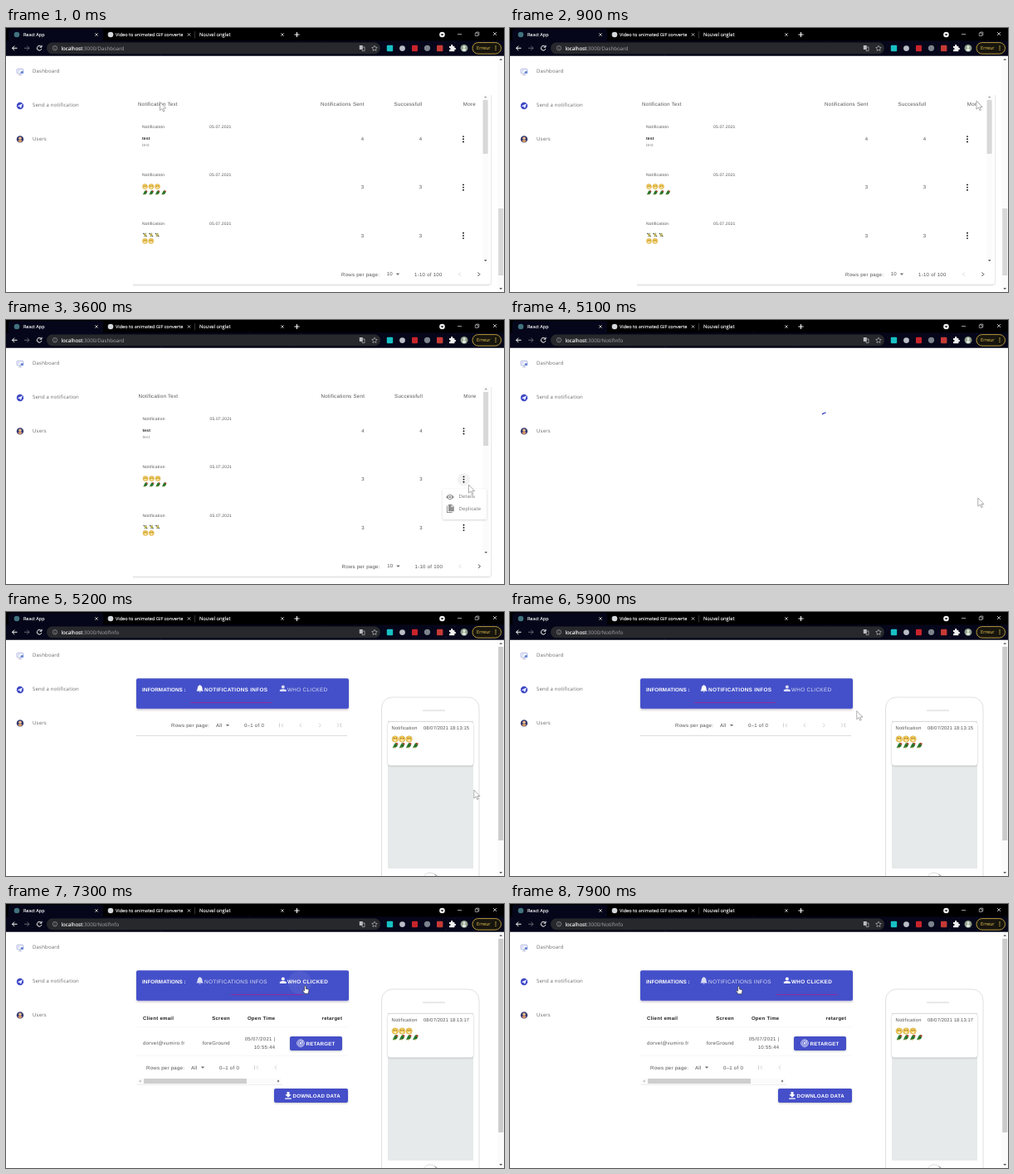
Write an HTML page that moves like this. It is 600 px wide and 319 px high and loops after 8 s.

```html
<!DOCTYPE html>
<html lang="en">
<head>
<meta charset="utf-8">
<title>Dashboard</title>
<style>
html, body { margin: 0; width: 100%; height: 100%; overflow: hidden; background: #fff; }
svg { display: block; width: 100vw; height: 100vh; }
text { font-family: "Liberation Sans", Arial, sans-serif; font-size: 6px; fill: #555; text-rendering: geometricPrecision; white-space: pre; }
.ui, .nav { font-family: "Open Sans", "Noto Sans", sans-serif; }
.ui { fill: #fff; font-size: 5.55px; stroke: #fff; stroke-width: .12px; }
.nav { fill: #666; letter-spacing: .2px; }
.head { font-size: 6.2px; letter-spacing: .25px; }
.small { font-size: 5px; letter-spacing: .2px; }
.date { font-size: 5px; letter-spacing: .15px; }
.page { font-size: 6.1px; letter-spacing: .25px; }
.cell { letter-spacing: .3px; }
.phone { font-size: 5.8px; letter-spacing: .2px; }
.clock { font-size: 5.8px; letter-spacing: .1px; }
.item { letter-spacing: .2px; }
.tab { font-size: 6.4px; letter-spacing: .3px; fill: #fff; }
.btn { font-size: 6.2px; letter-spacing: .18px; fill: #fff; font-weight: 700; }
.bold { font-weight: 700; fill: #222; }
.end { text-anchor: end; }
</style>
</head>
<body>
<svg id="stage" viewBox="0 0 600 319" preserveAspectRatio="none"></svg>
<script>
const BLUE = '#4450c9';
const stage = document.getElementById('stage');

const text = (cls, x, y, s, more = '') => `<text class="${cls}" x="${x}" y="${y}" ${more}>${s}</text>`;
const rect = (x, y, w, h, fill, r = 0, more = '') =>
  `<rect x="${x}" y="${y}" width="${w}" height="${h}" rx="${r}" fill="${fill}" ${more}/>`;
const dot = (x, y, r, fill, more = '') => `<circle cx="${x}" cy="${y}" r="${r}" fill="${fill}" ${more}/>`;
const line = (d, color, w = 1) =>
  `<path d="${d}" fill="none" stroke="${color}" stroke-width="${w}" stroke-linejoin="round"/>`;
const fill = (d, color) => `<path d="${d}" fill="${color}"/>`;
const use = (id, x, y, k = 1) => `<use href="#${id}" transform="translate(${x} ${y}) scale(${k})"/>`;
const group = (id, body, more = '') => `<g id="${id}" ${more}>${body}</g>`;
const repeat = (n, fn) => Array.from({ length: n }, (_, i) => fn(i)).join('');
const cross = (x, y, r, c) => line(`M${x - r} ${y - r}l${2 * r} ${2 * r}m0 ${-2 * r}l${-2 * r} ${2 * r}`, c, .8);
const chevron = (x, y, dir, c) => line(`M${x - dir} ${y - 2.2}l${2.2 * dir} 2.2l${-2.2 * dir} 2.2`, c, .9);
const drop = (x, y) => fill(`M${x - 2.2} ${y - 1}h4.4l-2.2 2.2z`, '#666');
const more = (x, y) => repeat(3, i => dot(x, y + (i - 1) * 3.2, .95, '#111'));

const defs = `<defs>
<filter id="soft" x="-20%" y="-20%" width="140%" height="140%"><feDropShadow dx="0" dy=".8" stdDeviation="1" flood-opacity=".25"/></filter>
<clipPath id="below"><rect x="153" y="81" width="442" height="238"/></clipPath>
<g id="face">${dot(0, 0, 3.1, '#f2cb5a', 'stroke="#c79a3c" stroke-width=".4"')}
${dot(-1.1, -.7, .5, '#6b4a1e')}${dot(1.1, -.7, .5, '#6b4a1e')}${fill('M-1.5 .8h3q-.3 1.4-1.5 1.4t-1.5-1.4z', '#fff3d2')}</g>
<g id="parrot">${fill('M-2.8 2.6Q-1.8.4-1-1.4Q0-3.2 1.7-2.6Q3-1.8 2.2.2Q.8 2.4-1 2z', '#2f7d32')}
${fill('M.8-2.8q2.1-.4 2.1 1.6l-1.5.5z', '#c8402f')}${fill('M-.8 1Q0-.8 1.4-.5Q.8 1.3-.8 1z', '#155c24')}${dot(-.4, 2.2, .6, '#d8a03c')}</g>
<g id="bird">${fill('M-2.9-2.5L-.4-1.3L1-2.8L1.3 0L2.7 2.3L.2 1.6L-1.5 2.8L-.9.4z', '#83935a')}
${dot(.2, 0, 1.1, '#e0c443')}${dot(-1.8, -1.6, .7, '#444b55')}${dot(1.5, 1.6, .7, '#444b55')}</g>
</defs>`;

function stars() {
  let seed = 7;
  const rnd = () => (seed = seed * 16807 % 2147483647) / 2147483647;
  return repeat(90, () => dot((rnd() * 600).toFixed(1), (14 + rnd() * 19).toFixed(1), .45, '#6674c0',
    `opacity="${(.1 + rnd() * .4).toFixed(2)}"`));
}

function chrome() {
  const puzzle = fill('M534 22h2q-.4-2 1.2-2t1.2 2h2v2q1.8-.3 1.8 1.1t-1.8 1.1v2h-6.4v-2q1.6 0 1.6-1.2t-1.6-1.1z', '#f1f1f1');
  return rect(0, 0, 600, 33.5, '#000') + rect(0, 15.5, 600, 18, '#05061a') +
    rect(3, 1, 114, 16, '#05061a', 3) + stars() +
    dot(13, 8, 3.3, '#41737f') + dot(126, 8, 3.3, '#d4d7da') +
    text('ui', 21, 10, 'React App', 'style="font-size:5.45px"') +
    text('ui', 132, 10, 'Video to animated GIF converte') +
    text('ui', 233, 10, 'Nouvel onglet', 'style="font-size:5.8px"') +
    cross(109, 8, 1.7, '#ddd') + cross(220.5, 8, 1.7, '#ddd') + cross(333, 8, 1.7, '#ddd') +
    line('M227.5 4v8.5', '#55575f', .6) + line('M347.5 8h6m-3-3v6', '#fff', 1) +
    dot(525.5, 8, 3.3, '#f4f4f4') + fill('M523.7 7.2h3.6l-1.8 2.2z', '#111') +
    line('M544 7.5h5', '#ddd', .7) + line('M565.3 6h3.5v3.5h-3.5zM566.4 6v-1h3.5v3.5h-1', '#ddd', .6) +
    cross(589, 7, 2, '#ddd') +
    line('M13.5 24.3h-6m2.7-2.7l-2.7 2.7l2.7 2.7', '#fff', 1) +
    line('M22 24.3h6m-2.7-2.7l2.7 2.7l-2.7 2.7', '#6e7078', .9) +
    line('M42.4 22.6a2.8 2.8 0 1 0 .5 2.4M43 20.8v2.4h-2.4', '#fff', 1) +
    rect(49, 17.6, 402, 13.6, '#27282b', 6.8) +
    line('M61.7 24.3a2.7 2.7 0 1 0-5.4 0a2.7 2.7 0 1 0 5.4 0M59 24v1.7M59 22.5v.7', '#aeb0b5', .6) +
    `<text class="ui" x="66.5" y="26.6" style="font-size:6.2px">localhost<tspan id="path" fill="#a9abb0" stroke="none"></tspan></text>` +
    rect(425.8, 21, 4, 5, '#b9bbc0', .5) + line('M428.5 23h3.6v4.6h-3z', '#b9bbc0', .7) +
    line('M444 21.2l1 2.1l2.3.3l-1.7 1.6l.4 2.3l-2-1.1l-2 1.1l.4-2.3l-1.7-1.6l2.3-.3z', '#c9cbd0', .6) +
    rect(458.8, 20.8, 7.4, 7.4, '#18c0c4', 1) + dot(477.5, 24.6, 3.4, '#b9bec6') +
    rect(489, 20.8, 7, 7.4, '#c8242b', 1) + dot(507.5, 24.3, 3.6, '#7d838c') +
    rect(519, 20.8, 7.4, 7.4, '#c63a36', 1) + puzzle +
    dot(552, 24.3, 4.4, '#8fa08a') + dot(552, 22.8, 1.5, '#e3e6e2') + rect(550, 24.5, 4, 3.6, '#e3e6e2', 1.5) +
    rect(562, 17.6, 34.5, 13.6, '#17150e', 6.8, 'stroke="#c7a63d" stroke-width=".9"') +
    text('ui', 567, 26.3, 'Erreur', 'style="fill:#f0cd55;stroke:none;font-size:5.7px"') +
    repeat(3, i => dot(590, 22 + i * 2.3, .7, '#f0cd55'));
}

function sidebar() {
  return rect(13.2, 49.6, 7.6, 5.2, '#fff', .6, 'stroke="#8a94d8" stroke-width=".7"') +
    line('M15 56.8h4M17 55v1.6', '#a3a9c4', .7) + rect(17.8, 52.2, 3, 2.6, '#5b7fd0', .4) + dot(15.4, 51.8, .7, '#8a94d8') +
    dot(17, 94, 4.2, '#3d48c4') + fill('M13.8 94.2L20 91.2L18 97L16.6 95.2z', '#e9ecff') +
    dot(17, 134.4, 4.2, '#353b70') + dot(17, 133.2, 1.7, '#f0bd8e') + fill('M14.4 137.3q0-2.2 2.6-2.2t2.6 2.2q-2.6 1.4-5.2 0z', '#d99a6a') +
    text('nav', 32, 54.4, 'Dashboard') + text('nav', 32, 95.4, 'Send a notification') + text('nav', 32, 136.3, 'Users');
}

const pageBar = (id, y, h, tone) => group(id, rect(592.5, 33.5, 7.5, 285.5, '#fbfbfb') + rect(593.2, y, 6, h, tone) +
  fill('M594.4 39l1.8-2.2l1.8 2.2z', '#666') + fill('M594.4 314l1.8 2.2l1.8-2.2z', '#555'));

function row(y, count) {
  return text('small', 164, y, 'Notification') + text('date', 245, y, '05.07.2021') +
    text('cell', 427.8, y + 15.1, count) + text('cell', 497.8, y + 15.1, count) + more(551, y + 13.3);
}

function dashboard() {
  const card = rect(150, 60, 434, 249.5, '#fff', 3, 'filter="url(#soft)"');
  const table = text('head', 159, 94.3, 'Notification Text') + text('head', 379, 94.3, 'Notifications Sent') +
    text('head', 467.5, 94.3, 'Successfull') + text('head', 550.8, 94.3, 'More') +
    dot(551, 192.7, 7.6, '#000', 'id="hover" opacity="0"') +
    row(121, 4) + row(179.3, 3) + row(237.6, 3) +
    text('small bold', 164, 135.4, 'test') + text('small', 164, 143, 'test', 'style="fill:#888"') +
    repeat(3, i => use('face', 167.5 + i * 7.5, 191.6)) + repeat(4, i => use('parrot', 167.6 + i * 7.5, 199)) +
    repeat(3, i => use('bird', 167.6 + i * 7.3, 250)) + repeat(2, i => use('face', 167.5 + i * 7.3, 257.4)) +
    rect(574, 80.5, 7.2, 204, '#fbfbfb') + rect(574.6, 87, 6, 65, '#d8d8d8') +
    fill('M576 84.3l1.7-2l1.7 2z', '#999') + fill('M576 280l1.7 2l1.7-2z', '#555') +
    text('page', 404, 299.6, 'Rows per page:') + text('page', 458.7, 299.4, '10') + drop(472, 297.5) +
    text('page', 492, 299.6, '1-10 of 100') + chevron(546.6, 297.6, -1, '#d4d4d4') + chevron(569.6, 297.6, 1, '#222');
  const eye = fill('M530 214q5-6.4 10 0q-5 6.4-10 0z', '#6d6d6d') + dot(535, 214, 2.2, '#fff') + dot(535, 214, 1.3, '#6d6d6d');
  const copy = fill('M531 224.5h1v7.6h5.6v1h-6.6z', '#6d6d6d') + fill('M533 222.8h4l2.8 2.8v5.6h-6.8z', '#6d6d6d') +
    fill('M536.6 223.6v2.4h2.4z', '#fff');
  const menu = rect(526, 204, 53, 37, '#fff', 1.5, 'filter="url(#soft)"') +
    rect(526, 207, 53, 13.5, '#000', 0, 'id="itemHover" opacity="0"') + eye + copy +
    text('item', 545.5, 215.4, 'Details') + text('item', 545.5, 229.8, 'Deplicate');
  return group('dash', `<g clip-path="url(#below)">${card}</g>` + group('table', table) +
    pageBar('barA', 218, 81, '#d8d8d8') + group('menu', menu));
}

// Footer of the small table: first and previous icons, optionally next and last.
function pager(x, y, full) {
  const first = d => line(`M${d < 0 ? x + 130.5 : x + 204.5} ${y - 4.6}v5`, '#ccc', .9);
  return text('page', x, y, 'Rows per page:') + text('page', x + 54, y, 'All') + drop(x + 68, y - 2) +
    text('page', x + 88, y, '0–1 of 0') + first(-1) + chevron(x + 134, y - 2.1, -1, '#ccc') + chevron(x + 156, y - 2.1, -1, '#ccc') +
    (full ? chevron(x + 179, y - 2.1, 1, '#ccc') + chevron(x + 201, y - 2.1, 1, '#ccc') + first(1) : '');
}

function clicked() {
  const target = dot(355, 168.2, 1.2, '#fff') +
    [2.7, 4.3].map(r => dot(355, 168.2, r, 'none', 'stroke="#fff" stroke-width=".8"')).join('');
  return text('cell bold', 165, 140.2, 'Client email') + text('cell bold end', 270, 140.2, 'Screen') +
    text('cell bold end', 324.5, 140.2, 'Open Time') + text('cell bold end', 405.3, 140.2, 'retarget') +
    line('M157 148.5h255M157 183.5h255', '#f3f3f3', .6) +
    text('cell', 165, 170.4, 'dorvel@vumiro.fr') + text('cell end', 270, 170.4, 'foreGround') +
    text('cell end', 324.5, 165.3, '05/07/2021 |') + text('cell end', 324.5, 174.6, '10:55:44') +
    rect(342, 160, 63, 17, BLUE, 2, 'filter="url(#soft)"') + target + line('M355 168.2l3-3', '#fff', .8) +
    text('btn', 361.5, 170.5, 'RETARGET') + pager(169, 199.6, false) +
    rect(158, 210.5, 174, 7, '#fbfbfb') + rect(166, 211, 124, 6, '#cecece') +
    fill('M162.4 212.4l-2 1.6l2 1.6z', '#aaa') + fill('M327.4 212.4l2 1.6l-2 1.6z', '#444') + line('M157 218.3h176', '#ddd', .6) +
    rect(323, 223, 89, 17, BLUE, 2, 'filter="url(#soft)"') +
    fill('M338.5 227h3v3.2h2.3l-3.8 3.6l-3.8-3.6h2.3zM336.2 234.6h7.6v1.1h-7.6z', '#fff') +
    text('btn', 345.5, 233.6, 'DOWNLOAD DATA');
}

function info() {
  const bell = fill('M229.6 95q1.2-1 1.2-3.4q0-2.4 2-2.9q.8-1.2 1.6 0q2 .5 2 2.9q0 2.4 1.2 3.4v.6h-8zM232.4 96.2h2.4q-1.2 1.6-2.4 0z', '#fff');
  const person = dot(333.8, 90.4, 2, '#fff') + fill('M329.8 96v-1.2q.4-1.8 4-1.8t4 1.8v1.2z', '#fff');
  const bar = rect(157, 81, 256, 36.4, '#c9bce0', 2, 'filter="url(#soft)"') + rect(157, 80.3, 256, 36.4, BLUE, 2) +
    text('tab', 164, 96.2, 'INFORMATIONS :', 'style="font-weight:700;font-size:6.3px;letter-spacing:.05px"') +
    group('tabA', bell + text('tab', 239, 96.2, 'NOTIFICATIONS INFOS')) +
    group('tabB', person + text('tab', 339, 96.2, 'WHO CLICKED')) +
    rect(222, 109, 98, 1, '#8f2a9f', 0, 'id="mark"') + dot(354, 95, 8, '#fff', 'id="ripple" opacity="0"');
  const phone = rect(452.5, 103, 117.5, 240, '#fff', 13, 'stroke="#d9d9d9" stroke-width=".8"') +
    line('M502 119h27', '#cfcfcf', .9) + rect(460, 132.5, 103, 177.5, '#e7eaea') +
    rect(460, 133, 103, 52.2, '#fff', 3.5, 'filter="url(#soft)"') + line('M460 132.3h103', '#ccc', .6) +
    text('phone', 464.5, 141.6, 'Notification') + text('clock', 503, 141.6, '', 'id="clock"') +
    repeat(3, i => use('face', 468.8 + i * 8.4, 153.5, 1.2)) + repeat(4, i => use('parrot', 469 + i * 8.1, 161.4, 1.2)) +
    dot(511, 323.5, 8.6, 'none', 'stroke="#d5d5d5" stroke-width=".8"') + line('M516.5 316.8l3.2 2.6', '#777', .8);
  return group('info', bar + group('paneA', pager(199, 138.9, true) + line('M157 149.5h254', '#d4d4d4', .8)) +
    group('paneB', clicked()) + phone + pageBar('barB', 42, 234, '#cbcbcb'));
}

const pointer = group('arrow', '<path d="M0 0V10.2L2.4 8L4 11.6L5.5 11L4 7.5H7.2z" fill="#fff" stroke="#777" stroke-width=".6"/>') +
  group('hand', '<path d="M-.9.5Q0-.5.9.5V3.4L3.6 4Q4.7 4.4 4.4 5.7L3.6 9.2H-.6L-3 5.8Q-2.4 4.6-.9 5.8z" fill="#fff" stroke="#222" stroke-width=".6"/>');

stage.innerHTML = defs + rect(0, 0, 600, 319, '#fff') + sidebar() + dashboard() + info() +
  group('wait', '<path d="M376 113.9Q378 112.5 380.6 111.9" fill="none" stroke="#3c48cc" stroke-width="1.4"/>') +
  chrome() + group('cursor', pointer);

const el = id => document.getElementById(id);
const show = (id, on) => el(id).setAttribute('visibility', on ? 'visible' : 'hidden');
const set = (id, name, value) => el(id).setAttribute(name, value);
const within = (t, a, b) => t >= a && t < b;
const ramp = (t, a, b) => Math.min(1, Math.max(0, (t - a) / (b - a)));
const ease = p => p * p * (3 - 2 * p);

// time, x, y of the pointer tip
const route = [
  [0, 185.5, 89.5], [900, 562, 88], [1600, 562, 88], [2200, 550.8, 119], [2500, 552, 153],
  [3100, 557.5, 199], [3600, 557.5, 199], [4300, 563.8, 215], [5200, 563.8, 215],
  [5700, 475, 140], [6100, 360.5, 99], [7300, 360.5, 99], [7900, 275.5, 99.5], [8000, 275.5, 99.5]
];

function place(t) {
  const i = Math.max(1, route.findIndex(k => k[0] > t));
  const [a, b] = [route[i - 1], route[i]];
  const p = ease(ramp(t, a[0], b[0]));
  return [a[1] + (b[1] - a[1]) * p, a[2] + (b[2] - a[2]) * p];
}

function draw(t) {
  const onInfo = t >= 5200, loading = within(t, 5100, 5200), second = t >= 7200;
  const menuOn = within(t, 3600, 5100);
  show('dash', t < 5100);
  show('wait', loading);
  show('info', onInfo);
  show('paneA', onInfo && !second);
  show('paneB', onInfo && second);
  show('barA', t < 3600);
  show('menu', menuOn);
  set('menu', 'opacity', t < 3700 ? .75 : t >= 5000 ? .5 : 1);
  set('table', 'transform', menuOn ? 'translate(.5 0)' : '');
  set('hover', 'opacity', within(t, 2900, 3900) ? .05 : 0);
  set('itemHover', 'opacity', t >= 4900 ? .1 : t >= 4000 ? .05 : 0);
  el('path').textContent = t < 5100 ? ':3000/Dashboard' : ':3000/NotifInfo';
  el('clock').textContent = '08/07/2021 18:13:' + (second ? 17 : t >= 6100 ? 16 : 15);

  for (const [id, on] of [['tabA', !second], ['tabB', second]]) {
    set(id, 'opacity', on ? 1 : .8);
    set(id, 'font-weight', on ? 700 : 400);
  }
  const slide = ease(ramp(t, 7100, 7500));
  set('mark', 'x', 222 + 98 * slide);
  set('mark', 'width', 98 - 23 * slide);
  const wave = ramp(t, 7000, 7500);
  set('ripple', 'r', 5 + 15 * wave);
  set('ripple', 'opacity', t >= 7100 ? .16 * (1 - wave) : 0);

  const [x, y] = place(t);
  const hand = within(t, 2900, 3600) || within(t, 3900, 5100) ||
    (t >= 6000 && y < 113 && x < 396);
  set('cursor', 'transform', `translate(${x.toFixed(2)} ${y.toFixed(2)})`);
  show('hand', hand);
  show('arrow', !hand);
}

const LOOP = 8000, STEP = 100;
let start;
function tick(now) {
  start ??= now;
  draw(Math.floor(((now - start + 4) % LOOP) / STEP) * STEP);
  requestAnimationFrame(tick);
}
draw(0);
requestAnimationFrame(tick);
</script>
</body>
</html>
```
